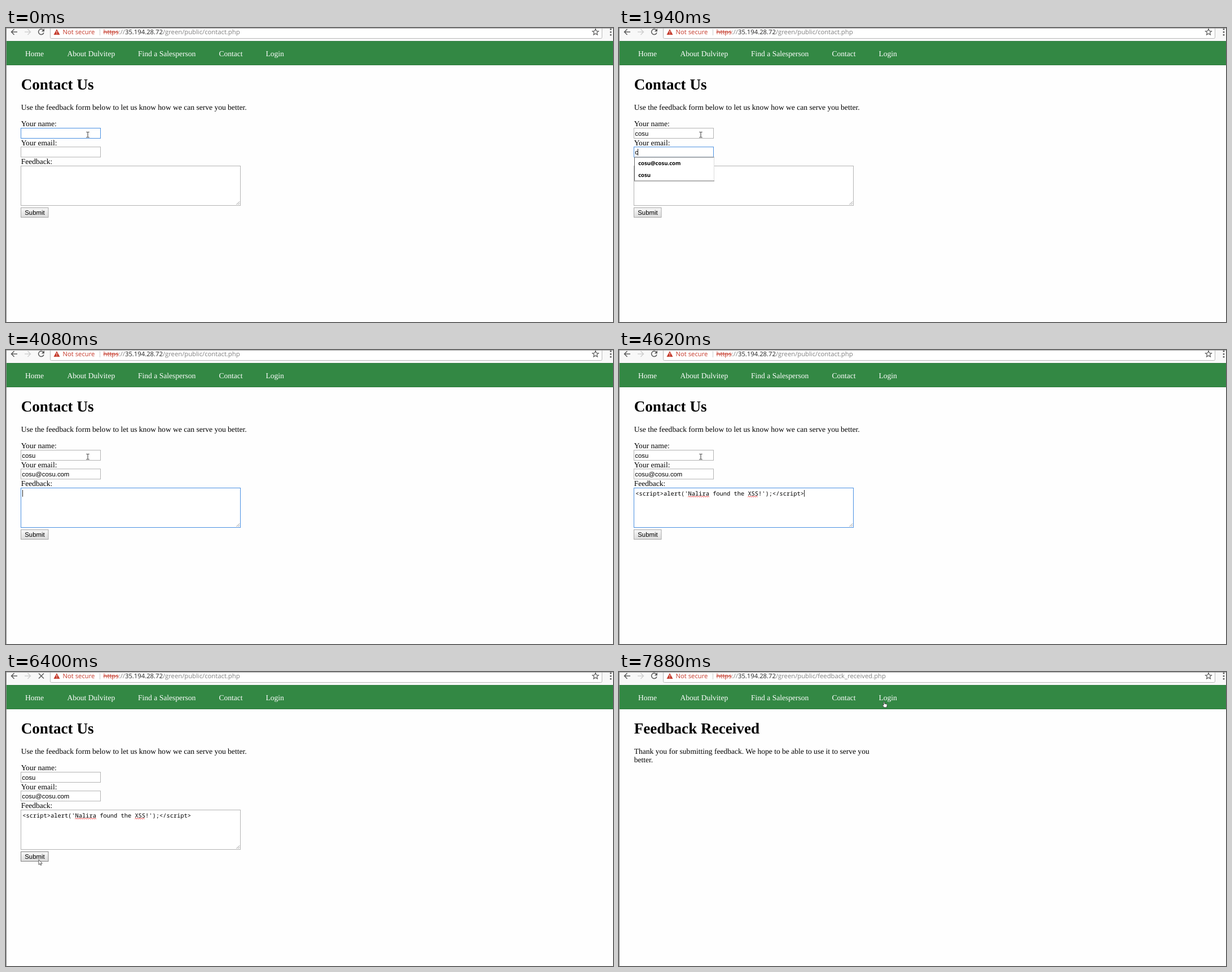
Animation, 1076 px wide and 521 px high, one loop 8 s. Source, as an HTML page:

```html
<!DOCTYPE html>
<html lang="en">
<head>
<meta charset="utf-8">
<title>Contact form</title>
<style>
  html, body { margin: 0; width: 100%; height: 100%; overflow: hidden; background: #fefefe; }
  svg { display: block; width: 1076px; height: 521px; }
  text { white-space: pre; text-rendering: geometricPrecision; }
  .serif { font: 13.56px "Liberation Serif", "Times New Roman", serif; }
  .title { font: bold 27.15px "Liberation Serif", "Times New Roman", serif; }
  .bar { font: 11.28px "Open Sans", "Noto Sans", sans-serif; }
  .option { font: bold 9.55px "Open Sans", "Noto Sans", sans-serif; }
  .field { font: 11.35px "Liberation Sans", Arial, sans-serif; }
  .code { font: 10.38px "Noto Sans Mono", "DejaVu Sans Mono", monospace; }
  .line { fill: none; stroke: #5a5a5a; stroke-width: 1.5; }
  .caret { fill: #222; }
</style>
</head>
<body>
<svg viewBox="0 0 1076 521">
  <defs>
    <linearGradient id="face" x2="0" y2="1">
      <stop offset="0" stop-color="#f8f8f8"/><stop offset="1" stop-color="#dcdcdc"/>
    </linearGradient>
    <linearGradient id="pressed" x2="0" y2="1">
      <stop offset="0" stop-color="#d8d8d8"/><stop offset="1" stop-color="#f0f0f0"/>
    </linearGradient>
  </defs>
  <rect width="1076" height="521" fill="#fefefe"/>

  <g id="toolbar">
    <rect width="1076" height="23" fill="#f8f8f8"/>
    <path d="M78.5 0V16.5Q78.5 18.5 80.5 18.5H1054.5Q1056.5 18.5 1056.5 16.5V0" fill="#fff" stroke="#b9b9b9"/>
    <path d="M0 .5H1076" stroke="#a5a5a5"/>
    <path class="line" d="M20 7H10M14.5 2L9.5 7L14.5 12"/>
    <path class="line" d="M33 7H43M38.5 2L43.5 7L38.5 12" style="stroke:#cfcfcf"/>
    <g id="reload">
      <path class="line" d="M66 3.6A4.8 4.8 0 1 0 67 8.2"/>
      <path d="M68 1V6.2H62.8Z" fill="#5a5a5a"/>
    </g>
    <path id="stop" class="line" d="M58 2.5L67 11.5M67 2.5L58 11.5"/>
    <path d="M90 2L95.5 12H84.5Z" fill="#c53a2b"/>
    <path d="M90 5.2V8.5M90 9.5V10.8" stroke="#fff"/>
    <text class="bar" x="100.5" y="11" fill="#c53a2b">Not secure</text>
    <path d="M166.5 2V13" stroke="#ccc"/>
    <text class="bar" x="172.5" y="11"><tspan fill="#c53a2b" text-decoration="line-through">https</tspan><tspan fill="#808080">://</tspan><tspan fill="#222">35.194.28.72</tspan><tspan id="path" fill="#808080"></tspan></text>
    <path d="M1045 1.6L1046.6 5.3L1050.4 5.6L1047.5 8.2L1048.4 12L1045 10L1041.6 12L1042.5 8.2L1039.6 5.6L1043.4 5.3Z" class="line" style="stroke-width:1.2"/>
    <path d="M1072 1V3.5M1072 6V8.5M1072 11V13.5" stroke="#5a5a5a" stroke-width="2.6"/>
  </g>

  <g id="nav" class="serif" fill="#fff">
    <rect y="23" width="1076" height="43" fill="#338844"/>
    <path d="M0 23.5H1076M0 65.5H1076" stroke="#2d7a3c"/>
    <text x="34" y="50">Home</text>
    <text x="108.5" y="50">About Dulvitep</text>
    <text x="234" y="50">Find a Salesperson</text>
    <text x="377.5" y="50">Contact</text>
    <text x="460.5" y="50">Login</text>
  </g>

  <text id="title" class="title" x="26.7" y="109"></text>
  <text id="intro" class="serif" x="26.7" y="145"></text>
  <text id="more" class="serif" x="26.7" y="160.3">better.</text>

  <g id="form">
    <g class="serif">
      <text x="26.7" y="174">Your name:</text>
      <text x="26.7" y="207.5">Your email:</text>
      <text x="26.7" y="241">Feedback:</text>
    </g>
    <rect id="nameBox" x="26.5" y="177.5" width="141" height="18" fill="#fff"/>
    <rect id="emailBox" x="26.5" y="210.8" width="141" height="18" fill="#fff"/>
    <rect id="noteBox" x="26.5" y="244.5" width="389" height="70" fill="#fff"/>
    <path d="M408.5 313L414 307.5M411.5 313L414 310.5" stroke="#999"/>
    <text id="nameText" class="field" x="28.3" y="190.6"></text>
    <text id="emailText" class="field" x="28.3" y="223.8"></text>
    <g id="note">
      <text class="code" x="29.2" y="257.6">&lt;script&gt;alert('Nalira found the XSS!');&lt;/script&gt;</text>
      <path id="squiggles" fill="none" stroke="#e33" stroke-width="1"/>
    </g>
    <rect id="caret" class="caret" width="1"/>
    <rect id="button" x="26.5" y="318.5" width="48.5" height="17" stroke="#a8a8a8"/>
    <text class="field" x="33.3" y="331">Submit</text>
    <g id="popup">
      <rect id="popupBack" x="27" width="142" fill="#fff"/>
      <path id="popupLight" fill="none" stroke="#dcdcdc"/>
      <path id="popupDark" fill="none" stroke="#666"/>
      <text id="option1" class="option" x="34.2"></text>
      <text id="option2" class="option" x="34.2"></text>
    </g>
  </g>

  <path d="M.5 0V521" stroke="#8c8c8c"/>

  <g id="pointer">
    <g id="beam"><path d="M-2.6 -4.6H-.6L0 -4L.6 -4.6H2.6M0 -4V4.2M-2.6 4.8H-.6L0 4.2L.6 4.8H2.6" fill="none" stroke="#333"/></g>
    <g id="arrow"><path d="M.5 .5V9.5L2.6 7.6L4 10.6L5.3 10L4 7.1H6.8Z" fill="#fff" stroke="#444" stroke-width=".9"/></g>
    <g id="hand"><path d="M2.6 1.2Q3.5 .2 4.3 1.2V4.2L8 5Q9 5.3 8.8 6.5L8 10.8H3.6L.7 7.2Q.4 6 1.5 6.1L2.6 7Z" fill="#fff" stroke="#333" stroke-width=".8"/></g>
  </g>
</svg>
<script>
const LOOP = 8000;
const NAME = "cosu", EMAIL = "cosu@cosu.com";
const el = {};
document.querySelectorAll("[id]").forEach(node => el[node.id] = node);

// Each track lists [start time, value...]; the value holds until the next entry.
const nameTyped = [[0, 0], [840, 1], [980, 2], [1110, 3], [1260, 4]];
const emailTyped = [[0, 0], [1940, 1], [2090, 2], [2220, 3], [2480, 4], [2770, 5],
  [3190, 6], [3310, 8], [3440, 9], [3560, 10], [3690, 12], [3810, 13]];
const focusTrack = [[0, "name"], [1520, "email"], [4080, "note"], [6010, "button"]];
const pointerTrack = [
  [0, "beam", 145, 189], [5160, "beam", 142, 194], [5290, "beam", 134, 209],
  [5430, "beam", 103, 257], [5560, "beam", 65, 308], [5710, "arrow", 59, 329],
  [5860, "arrow", 57.5, 332], [6950, "arrow", 88, 296], [7080, "arrow", 182, 200],
  [7200, "arrow", 300, 88], [7330, "beam", 398, 9], [7450, "beam", 429, 11],
  [7600, "arrow", 454, 30], [7750, "hand", 463, 44], [7880, "hand", 466.5, 52]];

const valueAt = (track, t) => track.findLast(step => step[0] <= t).slice(1);
const within = (t, from, to) => t >= from && t < to;
const show = (node, on) => node.style.display = on ? "" : "none";
const setText = (node, text) => { if (node.textContent !== text) node.textContent = text; };
const setAll = (node, attrs) => { for (const key in attrs) node.setAttribute(key, attrs[key]); };

function squiggle(from, to) {
  let d = `M${from} 260.5`;
  for (let x = from + 1.7, up = true; x <= to; x += 1.7, up = !up) d += `L${x} ${up ? 259 : 260.5}`;
  return d;
}
el.squiggles.setAttribute("d", squiggle(122.5, 160) + squiggle(228.5, 247));

function drawPopup(top, options) {
  const bottom = top + 21 * options.length;
  setAll(el.popupBack, { y: top, height: bottom - top });
  el.popupLight.setAttribute("d", `M168.5 ${top}V${bottom}`);
  el.popupDark.setAttribute("d", `M168.5 ${top + .5}H27.5V${bottom}`);
  const low = `M27 ${bottom + .5}H169`;
  const target = top > 200 ? el.popupDark : el.popupLight;
  target.setAttribute("d", target.getAttribute("d") + low);
  [el.option1, el.option2].forEach((node, i) => {
    setText(node, options[i] || "");
    node.setAttribute("y", top + 14.3 + 21 * i);
  });
}

function drawCaret(focus, t) {
  const pasted = t >= 4620;
  const visible = within(t, 410, 5160) || within(t, 5710, 6010);
  show(el.caret, visible);
  if (!visible) return;
  if (focus === "note") {
    setAll(el.caret, { x: pasted ? 328 : 29, y: 248, height: 12 });
  } else {
    const text = focus === "name" ? el.nameText : el.emailText;
    const width = text.textContent ? text.getComputedTextLength() : 0;
    setAll(el.caret, { x: Math.round(28 + width - .4), y: focus === "name" ? 180.5 : 214, height: 12 });
  }
}

function drawForm(t) {
  const [focus] = valueAt(focusTrack, t);
  const [emailCount] = valueAt(emailTyped, t);
  setText(el.nameText, NAME.slice(0, valueAt(nameTyped, t)[0]));
  setText(el.emailText, EMAIL.slice(0, emailCount));
  for (const key of ["name", "email", "note"])
    el[key + "Box"].setAttribute("stroke", focus === key ? "#4a90e2" : "#b3b3b3");
  show(el.note, t >= 4620);
  drawCaret(focus, t);

  const hover = within(t, 5710, 6680), down = within(t, 6010, 6400);
  setAll(el.button, { fill: down ? "url(#pressed)" : "url(#face)", stroke: hover ? "#858585" : "#a8a8a8" });

  const nameOpen = within(t, 980, 1520), emailOpen = within(t, 1940, 4080);
  show(el.popup, nameOpen || emailOpen);
  if (nameOpen) drawPopup(195.5, [NAME]);
  if (emailOpen) drawPopup(228.5, emailCount < 5 ? [EMAIL, NAME] : [EMAIL]);
}

function draw(t) {
  const sent = t >= 6680, loading = within(t, 6400, 6680);
  setText(el.path, `/green/public/${sent ? "feedback_received" : "contact"}.php`);
  setText(el.title, sent ? "Feedback Received" : "Contact Us");
  setText(el.intro, sent
    ? "Thank you for submitting feedback. We hope to be able to use it to serve you"
    : "Use the feedback form below to let us know how we can serve you better.");
  show(el.more, sent);
  show(el.reload, !loading);
  show(el.stop, loading);
  show(el.form, !sent);
  if (!sent) drawForm(t);

  const [shape, x, y] = valueAt(pointerTrack, t);
  for (const kind of ["beam", "arrow", "hand"]) show(el[kind], kind === shape);
  el.pointer.setAttribute("transform", `translate(${x} ${y})`);
}

const start = performance.now();
function frame() {
  draw((performance.now() - start) % LOOP);
  requestAnimationFrame(frame);
}
frame();
</script>
</body>
</html>
```
